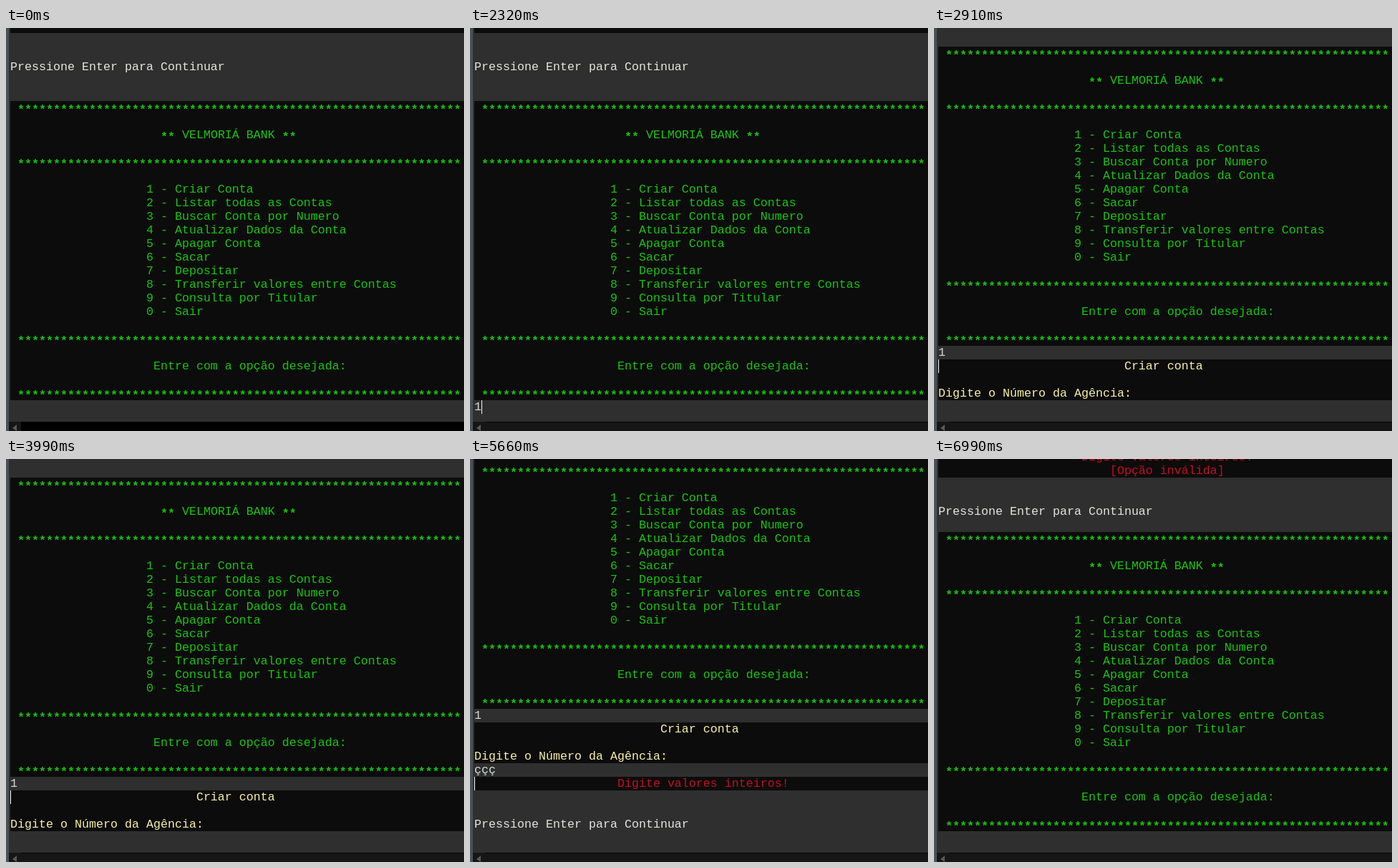
These frames come from a looping animation (640 by 563 pixels, 8 s). An HTML page:

```html
<!DOCTYPE html>
<html lang="pt">
<head>
<meta charset="utf-8">
<title>Console</title>
<style>
  html, body { margin: 0; width: 100%; height: 100%; overflow: hidden; background: #2f2f2f; }
  #stage { position: absolute; left: 0; top: 0; width: 640px; height: 563px; overflow: hidden; background: #2f2f2f; }
  #stage div, #stage svg { position: absolute; }
  #edge { left: 0; top: 0; width: 4px; height: 563px; background: #4b5154; }
  #view { left: 6px; top: 0; width: 634px; height: 550px; overflow: hidden; }
  #view .row {
    position: relative; height: 19px; white-space: pre; color: #e4e4e0;
    font: 16.66px/19px "Courier New", "Liberation Mono", monospace;
  }
  #view .green, #view .yellow, #view .red { background: #0c0c0c; }
  #view .green { color: #16c60c; }
  #view .yellow { color: #f9f1a5; }
  #view .red { color: #c50f1f; }
  #view .input { color: #d2dcd8; }
  #doc { left: 0; top: 0; width: 634px; }
  .stars { position: relative; top: 3px; font-weight: bold; }
  #caret { width: 1px; height: 19px; background: #f4f4f4; }
  #bar { left: 4px; top: 550px; width: 636px; height: 13px; background: #161616; }
  #thumb { left: 17px; top: 0; width: 619px; height: 13px; border-top: 1px solid #050505; box-sizing: border-box; }
  #stage svg { left: 0; top: 0; overflow: visible; }
</style>
</head>
<body>
<div id="stage">
  <div id="view"><div id="doc"></div></div>
  <div id="edge"></div>
  <div id="bar">
    <div id="thumb"></div>
    <svg width="17" height="13"><path d="M11 4V13L5 9Z" fill="#5a5a5a"/></svg>
  </div>
  <div id="caret"></div>
  <svg id="arrow" width="12" height="19"><path d="M.5.5V16L4 12.5 6.5 18 9 17 6.5 11.5H11.5Z" fill="#fff" stroke="#000"/></svg>
  <svg id="beam" width="8" height="16"><path d="M1 .5H3.5M4.5 .5H7M4 1V15M1 15.5H3.5M4.5 15.5H7" fill="none" stroke="#ddd"/></svg>
</div>
<script>
const LOOP = 8000, ROW = 19;
const $ = id => document.getElementById(id);
const line = (kind, col = 0, text = "") => ({ kind, text: " ".repeat(col) + text });
const blank = kind => line(kind);
const rule = () => line("green", 1, "*".repeat(62));
const press = () => line("plain", 0, "Pressione Enter para Continuar");

const options = [
  "1 - Criar Conta", "2 - Listar todas as Contas", "3 - Buscar Conta por Numero",
  "4 - Atualizar Dados da Conta", "5 - Apagar Conta", "6 - Sacar", "7 - Depositar",
  "8 - Transferir valores entre Contas", "9 - Consulta por Titular", "0 - Sair"
];
const menu = () => [
  rule(), blank("green"), line("green", 21, "** VELMORIÁ BANK **"), blank("green"),
  rule(), blank("green"), ...options.map(o => line("green", 19, o)), blank("green"),
  rule(), blank("green"), line("green", 20, "Entre com a opção desejada:"), blank("green"), rule()
];
const lines = [
  blank("green"), blank("plain"), blank("plain"), press(), blank("plain"), blank("plain"),
  ...menu(),
  line("input", 0, "1"),
  line("yellow", 26, "Criar conta"), blank("yellow"),
  line("yellow", 0, "Digite o Número da Agência:"),
  line("input", 0, "ççç"),
  line("red", 20, "Digite valores inteiros!"),
  line("red", 24, "[Opção inválida]"),
  blank("plain"), blank("plain"), press(), blank("plain"),
  ...menu()
];
const ANSWER = 32, INVALID = 34;

const rows = lines.map(({ kind, text }) => {
  const el = document.createElement("div");
  el.className = "row " + kind;
  for (const part of text.split(/(\*+)/)) {
    const span = document.createElement("span");
    if (part[0] === "*") span.className = "stars";
    span.textContent = part;
    el.append(span);
  }
  $("doc").append(el);
  return el;
});

// [time, scroll offset, last visible row]
const scrolls = [
  [0, -12, 27], [2320, -12, 28], [2850, -20, 29], [2910, -88, 31], [4610, -88, 32],
  [5600, -96, 33], [5660, -183, 37], [6930, -191, 39], [6990, -639, 60]
];
// [time, x, y]; a bare time hides the caret
const carets = [
  [0], [930, 6, 520], [1460], [1990, 6, 520], [2320, 16, 520], [2850, 6, 531],
  [2910, 6, 463], [3390], [3990, 6, 463], [4470], [4610, 16, 520], [4740, 26, 520],
  [4940, 36, 520], [5470], [5660, 6, 444], [6200], [6730, 6, 444], [6930]
];
const typed = [[0, 0], [4610, 1], [4740, 2], [4940, 3]];
// [time, shape, x, y]
const pointers = [
  [0], [190, "arrow", 427, 555], [280, "arrow", 415, 550], [370, "beam", 398, 538],
  [450, "beam", 388, 534], [860, "beam", 386, 534], [930, "beam", 385, 533], [2320]
];
const at = (steps, t) => steps.findLast(s => s[0] <= t);
const place = (el, x, y) => {
  el.style.display = x === undefined ? "none" : "block";
  if (x !== undefined) el.style.transform = `translate(${x}px, ${y}px)`;
};

function draw(t) {
  const [, offset, last] = at(scrolls, t);
  $("doc").style.transform = `translateY(${offset}px)`;
  rows.forEach((el, i) => { el.style.visibility = i <= last ? "visible" : "hidden"; });
  rows[INVALID].style.display = t < 6990 ? "none" : "block";
  rows[ANSWER].firstChild.textContent = "ç".repeat(at(typed, t)[1]);

  const [, cx, cy] = at(carets, t);
  place($("caret"), cx, cy);

  const [, shape, px, py] = at(pointers, t);
  for (const id of ["arrow", "beam"]) place($(id), id === shape ? px : undefined, py);
  $("thumb").style.background = t < 450 ? "#000" : "transparent";
}

const start = performance.now();
function tick() {
  draw((performance.now() - start) % LOOP);
  requestAnimationFrame(tick);
}
draw(0);
tick();
</script>
</body>
</html>
```
